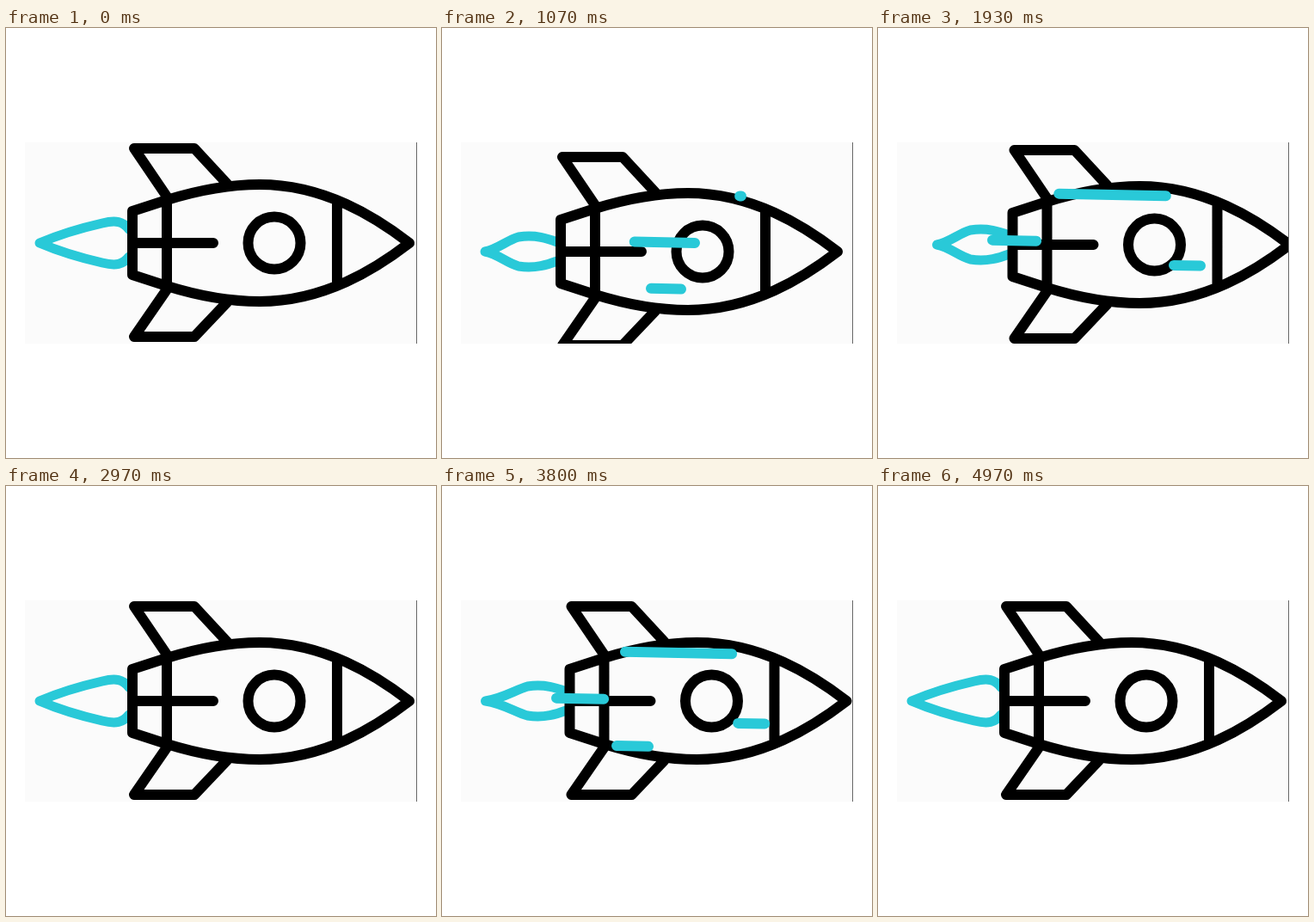
Recreate the animation shown at these times as an HTML page with a canvas. Size 500 by 500 pixels, loop 5.01 s.

```html
<!DOCTYPE html>
<html lang="en">
<head>
<meta charset="utf-8">
<title>Rocket</title>
<style>
  html, body { margin: 0; width: 100%; height: 100%; overflow: hidden; background: #fff; }
  canvas { display: block; }
</style>
</head>
<body>
<canvas id="stage" width="500" height="500"></canvas>
<script>
const ctx = document.getElementById('stage').getContext('2d');
const LOOP = 2505, START = 770, CYCLE = 630;
const CYAN = '#29c9d8';

// Eased value between [time, value] keys, held outside them.
function ease(keys, t) {
  if (t <= keys[0][0]) return keys[0][1];
  for (let i = 1; i < keys.length; i++) {
    const [t0, v0] = keys[i - 1], [t1, v1] = keys[i];
    if (t < t1) {
      const p = (t - t0) / (t1 - t0);
      return v0 + (v1 - v0) * p * p * (3 - 2 * p);
    }
  }
  return keys[keys.length - 1][1];
}

const shakeX = [[0, 0], [130, 5], [300, -9], [400, -5], [530, 1.5], [650, 7], [900, -9],
                [1030, -4], [1160, 9.5], [1300, 4], [1450, -6], [1620, 0]];
const shakeY = [[0, 0], [130, -1], [300, 10], [400, 8], [530, 0], [650, -1], [900, 10],
                [1030, 8], [1160, 2], [1300, 0], [1450, 6], [1620, 0]];
const flicker = [[0, 0], [100, 1], [1500, 1], [1620, 0]];
const flameTip = [[0, 0], [300, 5], [400, -5], [530, -5], [700, 5], [1030, -6], [1160, 5], [1400, -5], [1600, 0]];

const hull = new Path2D(`
  M147 213 L187 200 Q245 182 295 182 C370 182 430 220 469 250
  C430 280 370 318 295 318 Q245 318 187 300 L147 287 Z
  M187 198 V302 M385 202 V298 M147 250 H241
  M187 196 L149 140 H219 L257 181
  M187 304 L149 359 H219 L257 319
  M342.5 250 A30.5 30.5 0 1 1 281.5 250 A30.5 30.5 0 1 1 342.5 250`);

// Upper flame outline: x and distance from the axis, from nozzle to tip.
const calmFlame = [[143, 16], [136, 25], [128, 27], [112, 23], [90, 18], [60, 9], [39, 0]];
const wildFlame = [[143, 11], [132, 15], [118, 20], [98, 17], [84, 13], [72, 3], [54, 0]];

// Left and right ends over time.
const longStreak = { left: [[150, 294], [480, 133]], right: [[350, 294], [640, 133]] };
const windowStreak = { left: [[440, 380], [530, 344], [800, 260]], right: [[500, 380], [530, 375], [860, 260]] };
const lowStreak = {
  left: [[150, 300], [300, 243], [530, 203], [640, 190]],
  right: [[150, 300], [300, 278], [530, 240], [680, 190]]
};

function drawFlame(t) {
  const k = ease(flicker, t), shift = ease(flameTip, t);
  const points = calmFlame.map(([x, r], i) => [
    x + (wildFlame[i][0] - x) * k + (i === 6 ? shift : i === 5 ? shift / 2 : 0),
    r + (wildFlame[i][1] - r) * k
  ]);
  const upper = points.map(([x, r]) => [x, 250 - r]);
  const lower = points.map(([x, r]) => [x, 250 + r]).reverse();
  ctx.beginPath();
  ctx.moveTo(...upper[0]);
  for (const side of [upper, lower]) {
    for (let i = 1; i < 7; i += 3) ctx.bezierCurveTo(...side[i], ...side[i + 1], ...side[i + 2]);
  }
  ctx.lineWidth = 11;
  ctx.strokeStyle = CYAN;
  ctx.stroke();
}

function drawStreak(streak, t, y, dx = 0) {
  const left = ease(streak.left, t) + dx, right = ease(streak.right, t) + dx;
  if (right - left < 1) return;
  const slopeY = x => y + (x - 200) * 0.02;
  ctx.beginPath();
  ctx.moveTo(left, slopeY(left));
  ctx.lineTo(right, slopeY(right));
  ctx.lineWidth = 12;
  ctx.strokeStyle = CYAN;
  ctx.stroke();
}

function draw(now) {
  const t = (now % (2 * LOOP) - START + 2 * LOOP) % LOOP;
  ctx.fillStyle = '#fff';
  ctx.fillRect(0, 0, 500, 500);

  ctx.save();
  ctx.beginPath();
  ctx.rect(22, 133, 456, 234);
  ctx.clip();
  ctx.fillStyle = '#fbfbfb';
  ctx.fillRect(22, 133, 456, 234);
  ctx.lineCap = ctx.lineJoin = 'round';

  ctx.save();
  ctx.translate(ease(shakeX, t), ease(shakeY, t));
  drawFlame(t);
  ctx.lineWidth = 12;
  ctx.strokeStyle = '#000';
  ctx.stroke(hull);
  ctx.restore();

  for (const local of [t, t - CYCLE]) {
    drawStreak(longStreak, local, 248);
    drawStreak(longStreak, local - 130, 192.5, 54);
    drawStreak(windowStreak, local, 273);
  }
  drawStreak(lowStreak, t, 302);

  ctx.fillStyle = '#666';
  ctx.fillRect(477, 133, 1, 234);
  ctx.restore();
}

const begin = performance.now();
function tick() {
  draw(performance.now() - begin);
  requestAnimationFrame(tick);
}
tick();
</script>
</body>
</html>
```
